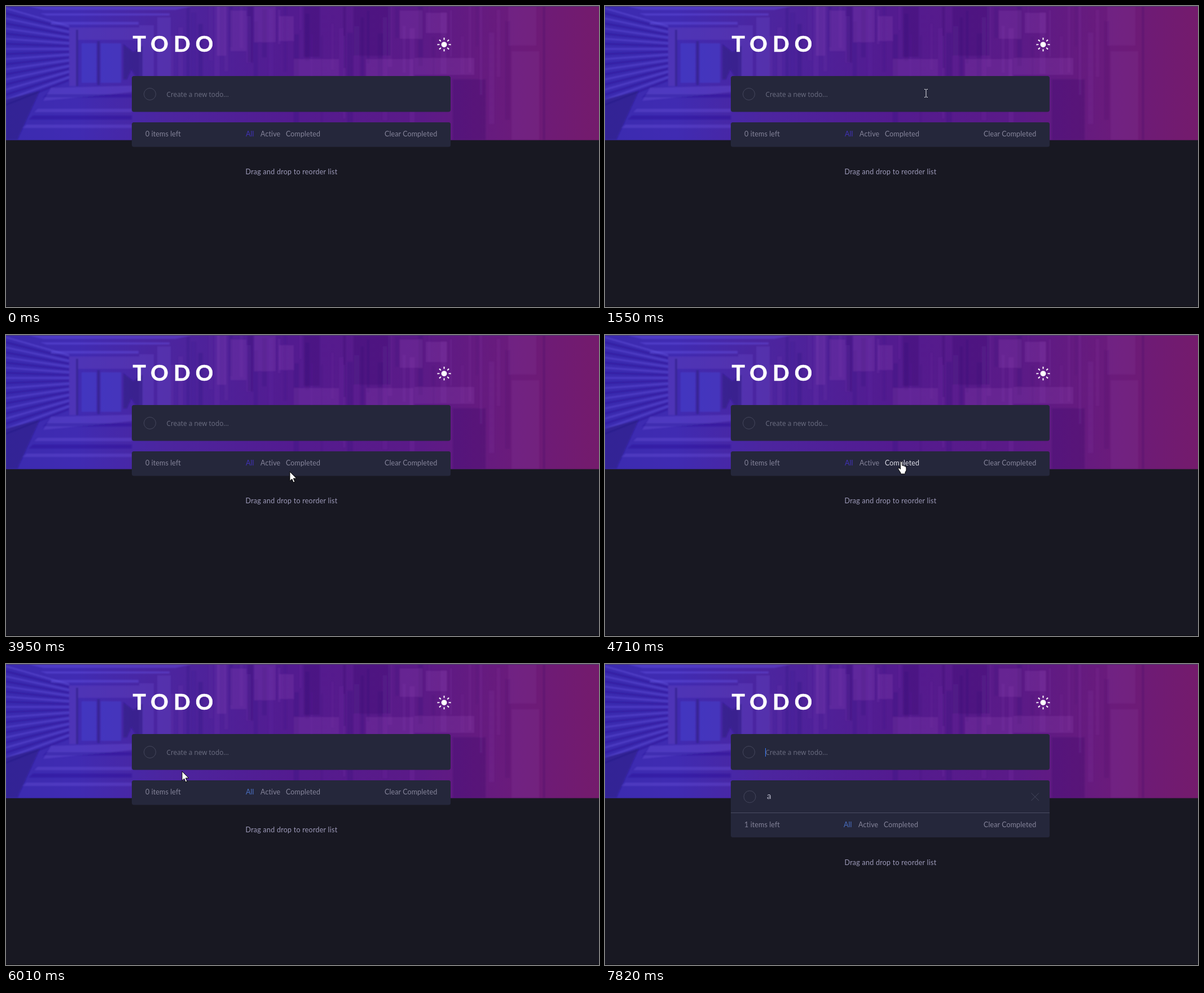
Write an HTML page that moves like this. It is 1051 by 533 pixels and loops after 8 s.

```html
<!DOCTYPE html>
<html lang="en">
<head>
<meta charset="utf-8">
<title>Todo</title>
<style>
  html, body { margin: 0; width: 100%; height: 100%; overflow: hidden; background: #181822; }
  svg { display: block; width: 100%; height: 100%; }
  text { font: 12.5px Lato, sans-serif; letter-spacing: .1px; fill: #85849a; white-space: pre; }
  .title { font-size: 39px; font-weight: 700; letter-spacing: 9.2px; fill: #fff; stroke: #fff; stroke-width: .7; }
  .input { font: 11.8px "Noto Sans", sans-serif; letter-spacing: 0; fill: #686a7e; }
  .card { fill: #25273b; }
  .ring { fill: none; stroke: #44465c; }
  .pointer { fill: #fff; stroke: #000; stroke-linejoin: round; }
</style>
</head>
<body>
<svg viewBox="0 0 1051 533">
  <defs>
    <linearGradient id="sky">
      <stop offset="0" stop-color="#3b2bb0"/>
      <stop offset=".12" stop-color="#402bb2"/>
      <stop offset=".27" stop-color="#4c259f"/>
      <stop offset=".48" stop-color="#531b90"/>
      <stop offset=".7" stop-color="#5b1a87"/>
      <stop offset=".86" stop-color="#6b1b7b"/>
      <stop offset="1" stop-color="#741b6c"/>
    </linearGradient>
    <filter id="soft"><feGaussianBlur stdDeviation=".8"/></filter>
    <clipPath id="band"><path d="M0 1H1051V237.5H0z"/></clipPath>
  </defs>

  <path fill="url(#sky)" d="M0 0H1051V237.5H0z"/>
  <g clip-path="url(#band)">
    <g filter="url(#soft)">
      <g id="slats"></g>
      <g id="beams" stroke-width="3" opacity=".3"></g>
      <!-- passage: ceiling, doorway, floor -->
      <path fill="#6a5cec" opacity=".35" d="M40 1H330L300 7H66zM60 13H290V17H72zM80 28H235V33H80z"/>
      <path fill="#6040bc" opacity=".45" d="M112 38H248V60H128V142H112zM236 34H262V132H236zM268 20H292V128H268z"/>
      <path fill="#4548d2" opacity=".45" d="M134 66H160V136H134zM168 66H204V136H168z"/>
      <path fill="#22126f" opacity=".4" d="M124 42H128V142H124zM162 62H166V140H162zM208 68L226 82 242 70V128H232L222 112 214 130H208zM0 165L60 150 20 237H0z"/>
      <path fill="#765ee0" opacity=".3" d="M80 145L225 141V152L66 168zM56 182H223V188H50zM36 210H223V216H30z"/>
      <path fill="#23118e" opacity=".3" d="M72 156H223V162H66zM48 194H223V201H40z"/>
      <!-- pillars and ledges -->
      <path fill="#a35bc0" opacity=".17" d="M374 1H390V88H374zM398 8H426V80H398zM440 1H478V64H440zM484 18H510V62H484zM698 8H738V58H698zM744 12H782V48H744zM638 94H722V126H638zM724 92H830V122H724zM510 94H590V124H510z"/>
      <path fill="#a35bc0" opacity=".1" d="M890 1H940V70H890zM896 80H945V237H896z"/>
      <path fill="#2c0a66" opacity=".2" d="M428 1H438V100H428zM528 1H556V90H528zM598 1H602V110H598zM616 1H682V88H616zM792 130H850V237H792zM952 1H955V237H952z"/>
    </g>
  </g>
  <path fill="#494467" d="M0 0H1051V1H0z"/>
  <path fill="#0b0b10" d="M0 532H1051V533H0z"/>

  <text class="title" x="224.5" y="81.2">TODO</text>
  <g transform="translate(776.5 68.3)">
    <circle r="4.9" fill="#fff"/>
    <circle r="10" fill="none" stroke="#fff" stroke-width="4" pathLength="80" stroke-dasharray="2.6 7.4" stroke-dashoffset="1.3"/>
  </g>

  <rect class="card" x="223" y="124" width="565" height="63.5" rx="4"/>
  <circle class="ring" cx="255" cy="156" r="10.5"/>
  <text class="input" id="entry" x="284.5" y="161"></text>
  <path id="caret" stroke="#3a7cfd" d="M0 149V164"/>

  <rect class="card" id="list" x="223" y="206" width="565" rx="3.5"/>
  <g id="item">
    <circle class="ring" cx="256.5" cy="235" r="10.5"/>
    <text x="287" y="239" style="font-size:15px;fill:#b9bacb">a</text>
    <path class="ring" d="M755.5 228.5L769 242M769 228.5L755.5 242"/>
    <path stroke="#4b4d62" d="M223 263.5H788"/>
  </g>
  <g id="footer">
    <text id="count" x="247" y="231"></text>
    <g id="filters">
      <text class="link" x="425" y="231">All</text>
      <text class="link" x="451" y="231">Active</text>
      <text class="link" x="496" y="231">Completed</text>
    </g>
    <text class="link" x="671" y="231">Clear Completed</text>
    <text x="506" y="298" text-anchor="middle" style="letter-spacing:.25px;fill:#9c99b8">Drag and drop to reorder list</text>
  </g>

  <g id="cursor">
    <circle id="click" r="11.5" fill="#ff0" opacity=".47"/>
    <path id="arrow" class="pointer" d="M0 0V16.5L3.8 13 6.3 19 9 18 6.4 12H11.8z"/>
    <path id="hand" class="pointer" d="M-1.5 1Q0-1 1.5 1V7Q3.5 6 4.5 8 6.5 7 7.2 9 9 8.5 9 11V16L7 19V22H-1V20L-5 14Q-6 11-3.5 11.5L-1.5 13.5z"/>
    <path id="beam" fill="none" stroke="#e8e8ee" d="M-3-7H-1L0-6 1-7H3M0-6V6M-3 7H-1L0 6 1 7H3"/>
  </g>
</svg>

<script>
const LOOP = 8000;
const $ = id => document.getElementById(id);
const show = (id, on) => $(id).setAttribute('display', on ? 'inline' : 'none');
const move = (id, x, y) => $(id).setAttribute('transform', `translate(${x} ${y})`);

// Pointer moves: start, end, number of steps, evenly spaced waypoints
const moves = [
  [400, 610, 4, '923,504 607,194'],
  [870, 1550, 9, '605,191 590,176 574,160 569,154.5'],
  [2280, 2700, 7, '580,150 690,95 771,58 788,69'],
  [2850, 3480, 9, '788,69 787,68 785,78 765,142 750,205 746,227 745,227'],
  [3740, 4500, 11, '735,232 640,240 503,242 478,238 465,232 462,230 466,229 480,229 500,228 518,226 525,225'],
  [4580, 5060, 7, '525,224 525,224 520,226 470,231 433,233 433,233 433,233'],
  [5310, 6080, 12, '418,236 400,236 375,234 350,230 325,225 305,220 290,214 281,208 279,203 290,197 312,190 354,161'],
  [6170, 6280, 3, '357,160 375,155']
].map(([start, end, steps, points]) =>
  ({ start, end, steps, points: points.split(' ').map(p => p.split(',').map(Number)) }));

function pointerAt(t) {
  const m = moves.findLast(m => t >= m.start);
  if (!m) return [-50, -50];
  const last = m.steps - 1;
  const step = Math.min(last, Math.floor((t - m.start) / (m.end - m.start) * last + 1e-6));
  const u = step / last * (m.points.length - 1);
  const i = Math.min(m.points.length - 2, Math.floor(u));
  const [a, b] = [m.points[i], m.points[i + 1]];
  return a.map((v, k) => v + (b[k] - v) * (u - i));
}

const inside = ([x, y], left, top, right, bottom) =>
  x >= left && x <= right && y >= top && y <= bottom;

const links = [...document.querySelectorAll('.link')];
const linkRights = [441, 486, 557, 765];

function render(t) {
  const added = t >= 7550, typed = t >= 7280 && t < 7820;
  const p = pointerAt(t);

  $('entry').textContent = typed ? 'a' : 'Create a new todo...';
  $('entry').style.fill = typed ? '#c8cbe0' : '';
  move('caret', typed ? 291.5 : 284.5, 0);
  show('caret', t >= 6550 && t < 7080 || t >= 7280);

  show('item', added);
  $('list').setAttribute('height', added ? 101 : 43.5);
  $('count').textContent = (added ? 1 : 0) + ' items left';
  move('footer', 0, added ? 57.5 : 0);
  move('filters', added ? -2 : 0, 0);

  const hovered = links.findIndex((el, i) =>
    inside(p, +el.getAttribute('x') - 1, 217, linkRights[i], 238));
  links.forEach((el, i) => {
    const base = i ? '' : t < 4980 ? '#4132b8' : '#4a70c4';
    el.style.fill = i === hovered ? '#dcdce6' : base;
  });

  const hand = hovered >= 0 || inside(p, 764, 56, 790, 82);
  const beam = inside(p, 280, 125, 772, 187);
  move('cursor', ...p);
  show('cursor', t >= 400 && t < 7280);
  show('hand', hand);
  show('beam', beam);
  show('arrow', !hand && !beam);
  show('click', t >= 4980 && t < 5060 || t >= 6480 && t < 6750);
}

// Backdrop texture: faint vertical slats, and ceiling and rail lines meeting at the doorway
let seed = 7;
const random = () => (seed = seed * 16807 % 2147483647) / 2147483647;
let slats = '', beams = '';
for (let x = 292; x < 900; x += 7 + random() * 12) {
  const fill = random() < .6 ? '#9c55c8' : '#25085e';
  slats += `<rect x="${x}" y="${random() * 90 - 30}" width="${3 + random() * 7}" height="${50 + random() * 140}" fill="${fill}" opacity="${.04 + random() * .08}"/>`;
}
for (let i = 0; i < 20; i++) {
  const stroke = i % 2 ? '#1e0f86' : '#7468f0';
  beams += `<path d="M0 ${4 + i * 9}L112 ${36 + i * 5}" stroke="${stroke}"/>`;
}
$('slats').innerHTML = slats;
$('beams').innerHTML = beams;

function tick() {
  render(performance.now() % LOOP);
  requestAnimationFrame(tick);
}
tick();
</script>
</body>
</html>
```
